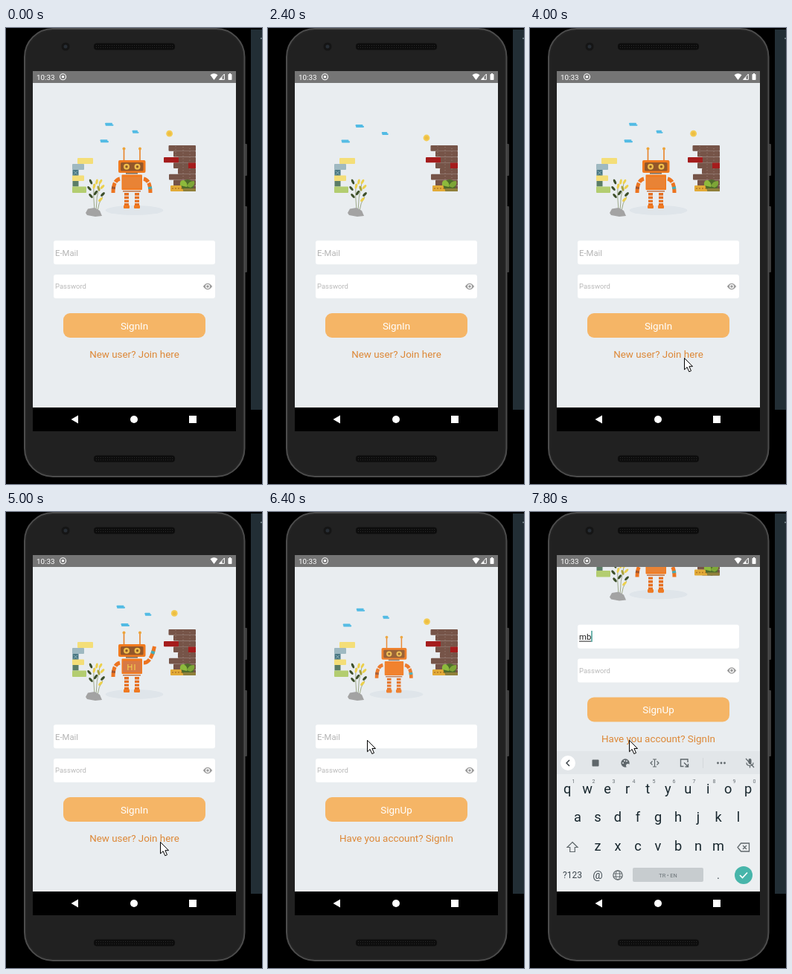
These frames come from a looping animation (344x614 px, 8 s). An HTML page:

```html
<!DOCTYPE html>
<html lang="en">
<head>
<meta charset="utf-8">
<title>Sign-in screen</title>
<style>
html, body { margin: 0; width: 100%; height: 100%; overflow: hidden; background: #000; }
svg { display: block; width: 344px; height: 614px; font-family: Roboto, sans-serif; }
</style>
</head>
<body>
<svg id="stage" viewBox="0 0 344 614"></svg>
<script>
const LOOP = 8000, STEP = 200, SCENE = 4000;
const stage = document.getElementById('stage');
const $ = id => document.getElementById(id);

// Markup helpers
const rect = (x, y, w, h, fill, r = 0, extra = '') =>
  `<rect x="${x}" y="${y}" width="${w}" height="${h}" rx="${r}" fill="${fill}" ${extra}/>`;
const circle = (x, y, r, fill, extra = '') =>
  `<circle cx="${x}" cy="${y}" r="${r}" fill="${fill}" ${extra}/>`;
const oval = (x, y, rx, ry, fill, extra = '') =>
  `<ellipse cx="${x}" cy="${y}" rx="${rx}" ry="${ry}" fill="${fill}" ${extra}/>`;
const shape = (d, fill, extra = '') => `<path d="${d}" fill="${fill}" ${extra}/>`;
const line = (d, color, width = 1, extra = '') =>
  `<path d="${d}" fill="none" stroke="${color}" stroke-width="${width}" ${extra}/>`;
const text = (x, y, size, fill, str, anchor = 'start', extra = '') =>
  `<text x="${x}" y="${y}" font-size="${size}" fill="${fill}" text-anchor="${anchor}" ${extra}>${str}</text>`;
const group = (id, body, extra = '') => `<g id="${id}" ${extra}>${body}</g>`;

// Timing helpers
const mix = (a, b, u) => a + (b - a) * u;
const ramp = (t, from, to) => Math.min(1, Math.max(0, (t - from) / (to - from)));
const ease = (t, from, to) => { const u = ramp(t, from, to); return u * u * (3 - 2 * u); };

function device() {
  const speaker = y => rect(118, y, 109, 9, '#0d0d0d', 4) +
    line(`M121 ${y + 3}H225M121 ${y + 6}H225`, '#2a2a2a', 1, 'stroke-dasharray="1 2"');
  return rect(0, 0, 344, 614, '#000') +
    rect(329, 2, 15, 512, '#222e35') + rect(342, 13, 2, 2, '#66757c') +
    rect(319, 156, 5, 43, '#3d3d3d', 1) + rect(319, 240, 5, 89, '#3d3d3d', 1) +
    rect(25, 1, 295.5, 603, '#242424', 38, 'stroke="#4c4c4c" stroke-width="2"') +
    rect(28, 4, 289.5, 597, '#212121', 35) +
    circle(80, 25, 5.5, '#151515') + circle(80, 25, 2.5, '#272d34') +
    speaker(20.5) + speaker(575.5) + rect(36, 58, 273, 485, '#000');
}

function statusBar() {
  return rect(36, 58, 273, 16, '#757575') + text(41, 69.5, 9.8, '#fff', '10:33') +
    circle(76.5, 65.7, 4, 'none', 'stroke="#fff" stroke-width="1.1"') + circle(76.5, 65.7, 1.8, '#fff') +
    shape('M274.5 63.2Q279.5 59.2 284.5 63.2L279.5 70Z', '#fff') +
    line('M286.5 69.4H293.4V62Z', '#fff', 1) + shape('M287 69.5h3.5v-3.8Z', '#fff') +
    rect(298.5, 62, 5, 8, '#fff', .8) + rect(300, 61, 2, 1.5, '#fff');
}

function navBar() {
  return rect(36, 511, 273, 32, '#000') + shape('M87.5 527L97 521.5V532.5Z', '#fff') +
    circle(172, 527, 5, '#fff') + rect(246, 522, 10, 10, '#fff');
}

function leftBricks() {
  return rect(96, 175, 21, 8, '#f4de78', 1) + rect(89, 183, 16, 8, '#9fb9c1', 1) +
    rect(89.5, 191, 8, 8, '#487681') + line('M91 192.5l5 5m0-5l-5 5', '#93b7bd', 1) +
    rect(89, 198.5, 16, 7.5, '#f4de78', 1) +
    rect(89.5, 206, 8, 7.5, '#5b7d66') + rect(89, 213.5, 19, 8.5, '#b3cd70', 1);
}

function plant() {
  const leaf = (x, y, turn, fill) =>
    oval(0, 0, 1.6, 3.6, fill, `transform="translate(${x} ${y}) rotate(${turn})"`);
  const dark = '#3d4f2a', gold = '#ecd04c';
  return line('M119 246Q117 226 118 210M121 247Q121 228 126 209M123 246Q124 236 130 227', '#7d8c5c', .7) +
    leaf(114, 207, -25, dark) + leaf(112, 216, -40, dark) + leaf(114, 226, -40, dark) +
    leaf(120.5, 222, 35, dark) + leaf(130, 224, 45, dark) +
    leaf(118.5, 213, 15, gold) + leaf(122, 207, 10, gold) + leaf(127, 207, 30, gold) +
    leaf(129.5, 214, 45, gold) + leaf(124.5, 216, -20, '#a9a33c') + leaf(127, 231, 45, gold) +
    shape('M107 249L110 243.5L119 242L126 246L129 253L120 254L109 252Z', '#a3a3a3');
}

function wall() {
  const starts = [218.5, 225, 231, 225, 231, 219, 225, 231];
  const rows = starts.map((x, i) => rect(x, 158 + i * 7.75, 255 - x, 7.8, '#765448', 1)).join('');
  return rows + line('M228 159V173M238 160V211M247 162V204', '#a08a80', .9, 'stroke-dasharray="1 2.9"') +
    rect(212, 174, 20, 7.3, '#a51c1c', 1) + rect(245, 181.5, 10, 7.5, '#a51c1c') +
    rect(221, 212, 18, 8, '#e2ab38', 1) + line('M223 216H238', '#b57725', 1.5, 'stroke-dasharray="2 2"') +
    oval(244, 212, 8.5, 8, '#4f6b2c') + shape('M234 212Q233 204 239 205Q245 209 243 214Z', '#8dba3c') +
    shape('M243 213Q246 205 253 206Q255 212 248 215Z', '#7da637') + rect(238, 216, 17, 4, '#90803a', 1);
}

function robot() {
  const antenna = x => rect(x - .8, 163, 1.6, 15, '#e98328') + circle(x, 162.5, 2, '#eda439');
  const eye = x => circle(x, 186.8, 4, '#efbd4b') + circle(x, 186.8, 1.7, '#8d5727');
  const leg = x => line(`M${x + 3} 222V243`, '#e66f20', 6, 'stroke-dasharray="3.4 1.3"') +
    rect(x - 1, 238.5, 8, 4.5, '#ef7a22', 1);
  const arm = (id, d, band) =>
    line(d, '#ed7420', 5, `id="${id}" pathLength="100" stroke-dasharray="34 6 60 10"`) +
    line(d, band, 5, `id="${id}Band" pathLength="100" stroke-dasharray="0 64 14 100"`);
  return leg(159) + leg(173) +
    arm('leftArm', 'M153 203Q144 205 144 222', '#a4572e') + arm('rightArm', '', '#42afba') +
    antenna(158.5) + antenna(180) + rect(151, 178, 36.5, 17, '#f07a1f', 2) +
    rect(154, 181, 30.5, 11.5, '#93572a', 1.5) +
    group('eyes', eye(162) + eye(176.5)) +
    group('lids', oval(162, 187, 4, 2.5, '#a8672b') + oval(176.5, 187, 4, 2.5, '#a8672b')) +
    rect(161, 195, 16, 1.5, '#7c674f') + rect(155.5, 197.5, 27.5, 20.5, '#f27a1f', 1) +
    rect(157, 200.5, 24.5, 15.5, '#e98335', 0, 'id="panel"') + rect(157, 219, 24, 1.5, '#c07040') +
    text(169, 213, 11, '#f1d850', 'HI', 'middle', 'id="hello" letter-spacing="1"');
}

const clouds = [
  { id: 'cloud1', w: 11, x: [123, 159], y: [132, 127] },
  { id: 'cloud2', w: 8.5, x: [157, 196], y: [142, 137] },
  { id: 'cloud3', w: 11, x: [104, 169], y: [152.5, 152] },
  { id: 'sun', x: [213, 228.4], y: [148, 134.5] }
];

function sky() {
  return clouds.map(c => group(c.id, c.w
    ? rect(-c.w / 2, -2, c.w - 1, 2.2, '#52bbe4', 1) + rect(-c.w / 2 + .5, -.2, c.w, 2.2, '#52bbe4', 1)
    : circle(0, 0, 4.4, '#f3cc55') + circle(0, 0, 2.5, '#edbd43'))).join('');
}

function form() {
  const field = y => rect(64, y, 217, 32, '#fff', 3);
  return field(286.3) + text(66, 306.5, 11.3, '#b4b4b4', 'E-Mail', 'start', 'id="email"') +
    line('M66 308.7H82.3', '#222', 1, 'id="underline"') + rect(66, 294.5, 1.4, 15, '#36978d', 0, 'id="caret"') +
    field(332) + text(66, 351.2, 9.5, '#b9b9b9', 'Password') +
    shape('M264.8 348Q271 339.5 277.2 348Q271 356.5 264.8 348Z', '#9b9b9b') +
    circle(271, 348, 2.4, '#9b9b9b', 'stroke="#fff" stroke-width="1.2"') +
    rect(77, 384, 191, 33, '#f5b566', 9) + text(172.5, 405.8, 13.4, '#fff', '', 'middle', 'id="submit"') +
    text(172.5, 444.4, 13.4, '#dd8837', '', 'middle', 'id="switch"');
}

function keyboard() {
  const ink = '#5f676b';
  const row = (keys, x, y) => [...keys].map((k, i) =>
    text(x + i * 27, y, 18.2, '#17262d', k, 'middle', 'class="key"')).join('');
  const digits = [...'1234567890'].map((d, i) => text(58.5 + i * 27, 365, 7, '#687075', d, 'middle')).join('');
  return rect(36, 322, 273, 189, '#eceff1') + rect(36, 322, 273, 31, '#e2e6e9') +
    circle(51, 338, 10, '#fff') + line('M53 334l-4 4 4 4', '#333b40', 1.4) +
    rect(83.5, 333.5, 9, 9, ink, 1) +
    circle(128, 338, 5.7, ink) + [[125, 338], [127, 335], [130, 335.5]].map(p => circle(...p, 1, '#e2e6e9')).join('') +
    circle(131.5, 341.5, 2.5, '#e2e6e9') +
    line('M165 333h5m-5 10h5m-2.5-10v10M164.5 335.5l-2.5 2.5 2.5 2.5M170.5 335.5l2.5 2.5-2.5 2.5', ink, 1.2) +
    line('M212 337v-4h-9.5v9.5h4M207 337.5l5.5 5.5m0-4v4h-4', ink, 1.4) +
    line('M232.5 331V345', '#d3d8db') +
    [252.5, 257, 261.5].map(x => circle(x, 338, 1.4, ink)).join('') +
    rect(293.5, 332, 4, 7.5, ink, 2) + line('M291 337.5q0 4 4.5 4t4.5-4M295.5 341.5v3M290 332l11 12', ink, 1.2) +
    digits + group('letters', row('QWERTYUİOP', 50.2, 380) + row('ASDFGHJKL', 64, 418.7) + row('ZXCVBNM', 91, 457.7)) +
    shape('M57 444.5l7 7h-3.7v6h-6.6v-6H50Z', ink, `id="shift" stroke="${ink}" stroke-width="1.2"`) +
    line('M283.5 446H294.5V457H283.5L279 451.5ZM286 449l5 5m0-5l-5 5', ink, 1.3) +
    text(57, 493, 12, '#3b464d', '?123', 'middle') + text(91, 494, 15, '#3b464d', '@', 'middle') +
    circle(118, 489, 6.2, 'none', `stroke="${ink}" stroke-width="1.2"`) +
    oval(118, 489, 2.8, 6.2, 'none', `stroke="${ink}"`) + line('M112 487h12m-12 4h12', ink) +
    rect(138, 479, 95, 19, '#c7cccf', 2) + text(185.5, 491.5, 7.3, '#687075', 'TR • EN', 'middle') +
    text(253, 493.5, 15, '#3b464d', '.', 'middle') +
    circle(287, 489, 12, '#47b5aa') + line('M282 489l3.5 3.5 6.5-7', '#fff', 1.7);
}

stage.innerHTML =
  '<clipPath id="screen"><rect x="36" y="74" width="273" height="437"/></clipPath>' +
  device() +
  `<g clip-path="url(#screen)">${rect(36, 74, 273, 437, '#fafafa') +
    group('page', rect(36, 74, 273, 437, '#e9edf0') + group('content',
      sky() + leftBricks() + wall() +
      group('actor', oval(172.5, 245.5, 39, 6.5, '#dfe5ea') + robot()) +
      plant() + form())) +
    group('keyboard', keyboard())}</g>` +
  statusBar() + navBar() +
  group('pointer', shape('M0 0V15.5L3.6 12.2L6.3 18.3L9 17.1L6.4 11.2H11Z', '#fff', 'stroke="#000" stroke-linejoin="round"'));

const set = (id, attrs) => Object.entries(attrs).forEach(([k, v]) => $(id).setAttribute(k, v));
const keys = [...document.querySelectorAll('.key')];
const capitals = keys.map(k => k.textContent);

function drawScene(phase) {
  const drift = ease(phase, 250, 3450);
  for (const c of clouds)
    set(c.id, { transform: `translate(${mix(...c.x, drift)} ${mix(...c.y, drift)})` });

  const size = ease(phase, 100, 700);
  set('actor', { transform: `translate(172 245) scale(${size}) translate(-172 -245)`, opacity: size });

  const wave = ease(phase, 2100, 2550);
  const swing = 2 * wave * Math.sin((phase - 2900) / 400 * 2 * Math.PI);
  const d = `M185 203Q${mix(194, 195, wave)} ${mix(205, 203, wave)} ${mix(194, 199.5, wave) + swing} ${mix(222, 181, wave)}`;
  set('rightArm', { d });
  set('rightArmBand', { d });
  set('hello', { opacity: wave });
  set('panel', { fill: wave > .5 ? '#d77a46' : '#e98335', opacity: ease(phase, 1250, 1700) });
  const blink = phase > 1100 && phase < 1300;
  set('eyes', { opacity: blink ? 0 : 1 });
  set('lids', { opacity: blink ? 1 : 0 });
}

function drawForm(t) {
  const signUp = t >= 5720;
  const typed = t < 7400 ? '' : t < 7700 ? 'm' : 'mb';
  const width = [0, 10, 16.3][typed.length];
  $('submit').textContent = signUp ? 'SignUp' : 'SignIn';
  $('switch').textContent = signUp ? 'Have you account? SignIn' : 'New user? Join here';
  $('email').textContent = typed || 'E-Mail';
  set('email', { fill: typed ? '#222' : '#b4b4b4' });
  set('underline', { d: `M66 308.7h${width}`, opacity: typed ? 1 : 0 });
  set('caret', { x: 66 + width, opacity: t >= 6500 ? 1 : 0 });

  const leave = signUp ? 0 : ramp(t, 5410, 5710);
  const scroll = 134.6 * ease(t, 7380, 7580);
  set('page', { opacity: 1 - leave });
  set('content', {
    transform: `translate(172.5 ${292.5 - scroll}) scale(${1 + .102 * leave}) translate(-172.5 -292.5)`
  });

  set('keyboard', { transform: `translate(0 ${189 * (1 - ease(t, 6450, 6700))})` });
  set('letters', { transform: `translate(0 ${typed ? -1.3 : 0})` });
  keys.forEach((key, i) => {
    const k = capitals[i];
    key.textContent = !typed ? k : k === 'İ' ? 'i' : k.toLowerCase();
  });
  set('shift', { 'fill-opacity': typed ? 0 : 1 });
}

function drawPointer(t) {
  const stops = [[3600, 74, 499], [4000, 207.5, 444.5], [5200, 207.5, 444.5], [5600, 142.5, 317.3],
    [6100, 142.5, 317.3], [6400, 133.5, 307.3], [LOOP, 133.5, 307.3]];
  const i = Math.max(1, stops.findIndex(s => t < s[0]));
  const [[t0, x0, y0], [t1, x1, y1]] = [stops[i - 1], stops[i]];
  const u = ease(t, t0, t1);
  set('pointer', { transform: `translate(${mix(x0, x1, u)} ${mix(y0, y1, u)})`, opacity: t < 3600 ? 0 : 1 });
}

function draw(now) {
  const t = Math.floor(now % LOOP / STEP) * STEP;
  drawScene(t < 5720 ? (t + 1700) % SCENE : t - 5800);
  drawForm(t);
  drawPointer(t);
}

const start = performance.now();
function tick() {
  draw(performance.now() - start);
  requestAnimationFrame(tick);
}
tick();
</script>
</body>
</html>
```
